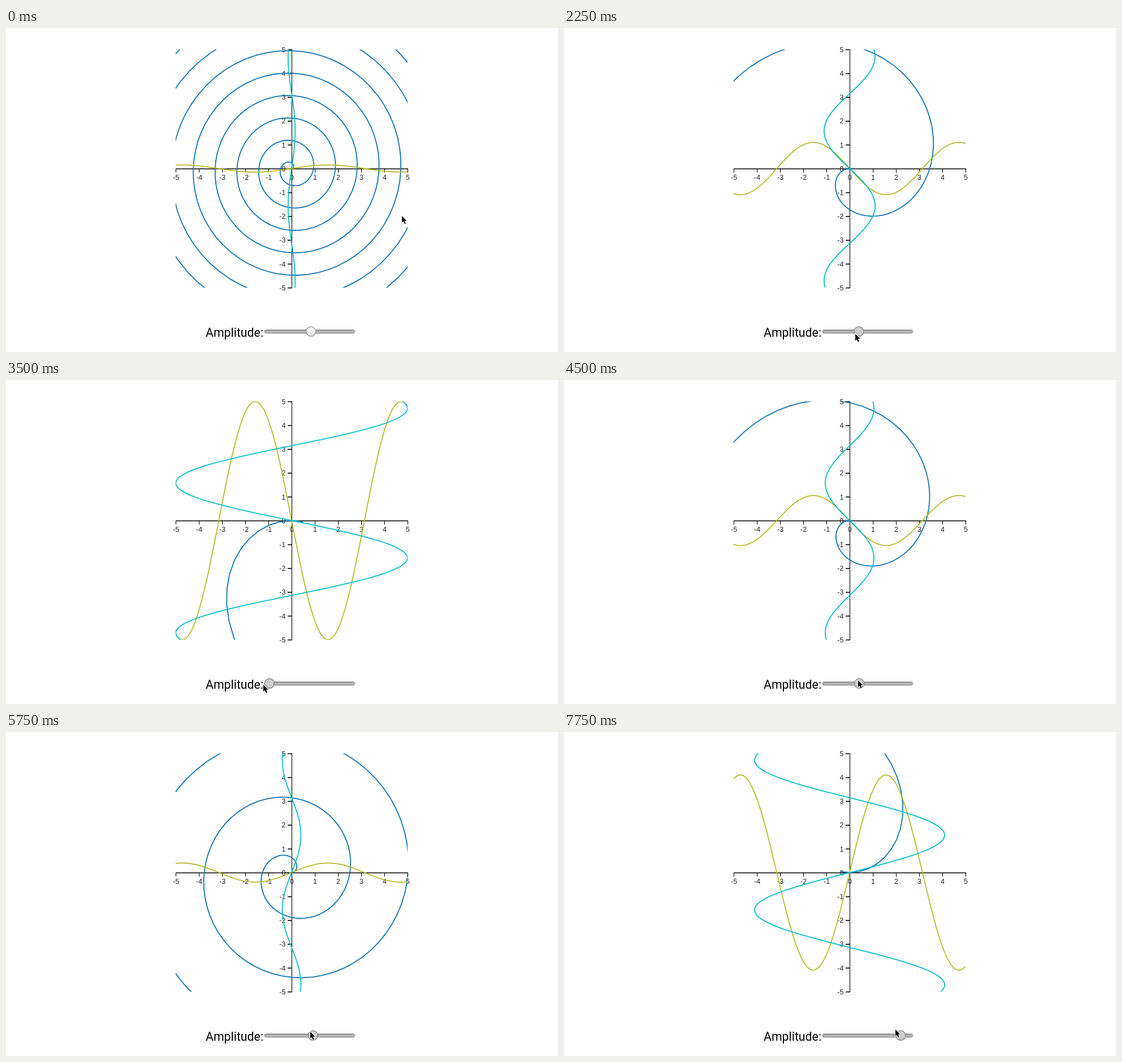
Animation of 976 by 574 pixels, one loop 8 s. Source, as an HTML page with a canvas:

```html
<!DOCTYPE html>
<html lang="en">
<head>
<meta charset="utf-8">
<title>Amplitude</title>
<style>
  html, body { margin: 0; width: 100%; height: 100%; overflow: hidden; background: #fff; }
  canvas { display: block; }
</style>
</head>
<body>
<canvas id="stage" width="976" height="574"></canvas>
<script>
const ctx = document.getElementById('stage').getContext('2d');
const LOOP = 8000, STEP = 250, PRESS_TIME = 1500;
const plot = { left: 300, top: 38, width: 410, height: 422, limit: 5 };
const unitX = plot.width / 10, unitY = plot.height / 10;
const originX = plot.left + plot.width / 2, originY = plot.top + plot.height / 2;
const toX = x => originX + x * unitX;
const toY = y => originY - y * unitY;

// time, amplitude, pointer x, pointer y
const keys = [
  [0, 0.15, 700, 333],
  [250, 0.15, 697, 345],
  [1250, 0.15, 541, 543],
  [1500, 0.15, 537, 544],
  [2250, -1.1, 515, 542],
  [3250, -5, 453, 542],
  [3500, -5, 455, 540],
  [4500, -1.05, 520, 532],
  [5125, 2, 562, 533],
  [5750, 0.4, 538, 531],
  [6125, -0.4, 528, 530],
  [6750, 2.95, 577.5, 525],
  [7250, 5, 607, 526],
  [7750, 4.1, 586, 527]
];

// Tangents vanish at turning points, so the curve never overshoots.
function slope(i, c) {
  if (i === 0 || i === keys.length - 1) return 0;
  const [a, b, d] = [keys[i - 1], keys[i], keys[i + 1]];
  const before = (b[c] - a[c]) / (b[0] - a[0]);
  const after = (d[c] - b[c]) / (d[0] - b[0]);
  return before * after <= 0 ? 0 : 2 * before * after / (before + after);
}

function valueAt(t, c) {
  let i = 0;
  while (i < keys.length - 2 && t >= keys[i + 1][0]) i++;
  const a = keys[i], b = keys[i + 1], span = b[0] - a[0];
  const u = Math.min(1, (t - a[0]) / span), v = 1 - u;
  return a[c] * v * v * (1 + 2 * u) + b[c] * u * u * (3 - 2 * u)
    + span * u * v * (slope(i, c) * v - slope(i + 1, c) * u);
}

function line(x1, y1, x2, y2, width) {
  ctx.lineWidth = width;
  ctx.beginPath();
  ctx.moveTo(x1, y1);
  ctx.lineTo(x2, y2);
  ctx.stroke();
}

function drawAxes() {
  const axisX = originX + 0.5, axisY = originY + 0.5;
  ctx.strokeStyle = '#000';
  ctx.fillStyle = '#222';
  ctx.font = '12.3px "Liberation Sans", Arial, sans-serif';
  ctx.textBaseline = 'alphabetic';
  line(plot.left, axisY, plot.left + plot.width + 1, axisY, 1.6);
  line(axisX, plot.top, axisX, plot.top + plot.height + 1, 1.1);
  for (let n = -plot.limit; n <= plot.limit; n++) {
    const x = toX(n) + 0.5, y = toY(n) + 0.5;
    line(x, axisY, x, axisY + 6.5, 1.1);
    line(axisX - 7.5, y, axisX, y, 1.6);
    ctx.textAlign = 'center';
    ctx.fillText(n, x, 269.3);
    ctx.textAlign = 'right';
    ctx.fillText(n, 494.3, y + 4.2);
  }
}

function curve(color, from, to, point) {
  ctx.strokeStyle = color;
  ctx.lineWidth = 1.8;
  ctx.beginPath();
  for (let k = Math.round(from * 10); k <= to * 10; k++) {
    const [x, y] = point(k / 10);
    ctx.lineTo(toX(x), toY(y));
  }
  ctx.stroke();
}

function drawCurves(amp) {
  ctx.save();
  ctx.beginPath();
  ctx.rect(plot.left, plot.top, plot.width, plot.height);
  ctx.clip();
  ctx.lineJoin = 'round';
  curve('#1074b2', -0.1, 100, a => [amp * a * Math.cos(a), amp * a * Math.sin(a)]);
  curve('#b8ba2c', -5, 5, x => [x, amp * Math.sin(x)]);
  curve('#06becc', -5, 5, y => [amp * Math.sin(y), y]);
  ctx.restore();
}

function drawSlider(amp, pressed) {
  ctx.fillStyle = '#000';
  ctx.font = '21.3px Roboto, sans-serif';
  ctx.textAlign = 'left';
  ctx.fillText('Amplitude:', 353, 547);

  const track = ctx.createLinearGradient(0, 534, 0, 541);
  track.addColorStop(0, '#929292');
  track.addColorStop(0.5, '#b2b2b2');
  track.addColorStop(1, '#b8b8b8');
  ctx.fillStyle = track;
  ctx.strokeStyle = '#8c8c8c';
  ctx.lineWidth = 1;
  ctx.beginPath();
  ctx.roundRect(457, 534.7, 159.5, 6.2, 3);
  ctx.fill();
  ctx.stroke();

  const thumb = ctx.createLinearGradient(0, 529, 0, 546);
  thumb.addColorStop(0, pressed ? '#d2d2d2' : '#f4f4f4');
  thumb.addColorStop(1, pressed ? '#c8c8c8' : '#e2e2e2');
  ctx.fillStyle = thumb;
  ctx.strokeStyle = pressed ? '#777' : '#8a8a8a';
  ctx.lineWidth = 1.2;
  ctx.beginPath();
  ctx.arc(537 + amp * 14.25, 537.7, 8.5, 0, Math.PI * 2);
  ctx.fill();
  ctx.stroke();
}

function drawPointer(x, y) {
  const outline = [[0, 0], [0, 12], [2.7, 9.6], [4.8, 14.2], [6.8, 13.3], [4.8, 8.8], [8.5, 8.5]];
  ctx.save();
  ctx.translate(x, y);
  ctx.beginPath();
  outline.forEach(p => ctx.lineTo(...p));
  ctx.closePath();
  ctx.lineJoin = 'round';
  ctx.strokeStyle = '#fff';
  ctx.lineWidth = 1.8;
  ctx.stroke();
  ctx.fillStyle = '#000';
  ctx.fill();
  ctx.restore();
}

function draw(now) {
  const t = Math.floor((now % LOOP) / STEP) * STEP;
  const amp = Math.round(valueAt(t, 1) * 20) / 20;
  ctx.fillStyle = '#fff';
  ctx.fillRect(0, 0, 976, 574);
  drawAxes();
  drawCurves(amp);
  drawSlider(amp, t >= PRESS_TIME);
  drawPointer(valueAt(t, 2), valueAt(t, 3));
}

let start;
function tick(now) {
  start ??= now;
  draw(Math.max(0, now - start));
  requestAnimationFrame(tick);
}
draw(0);
requestAnimationFrame(tick);
</script>
</body>
</html>
```
